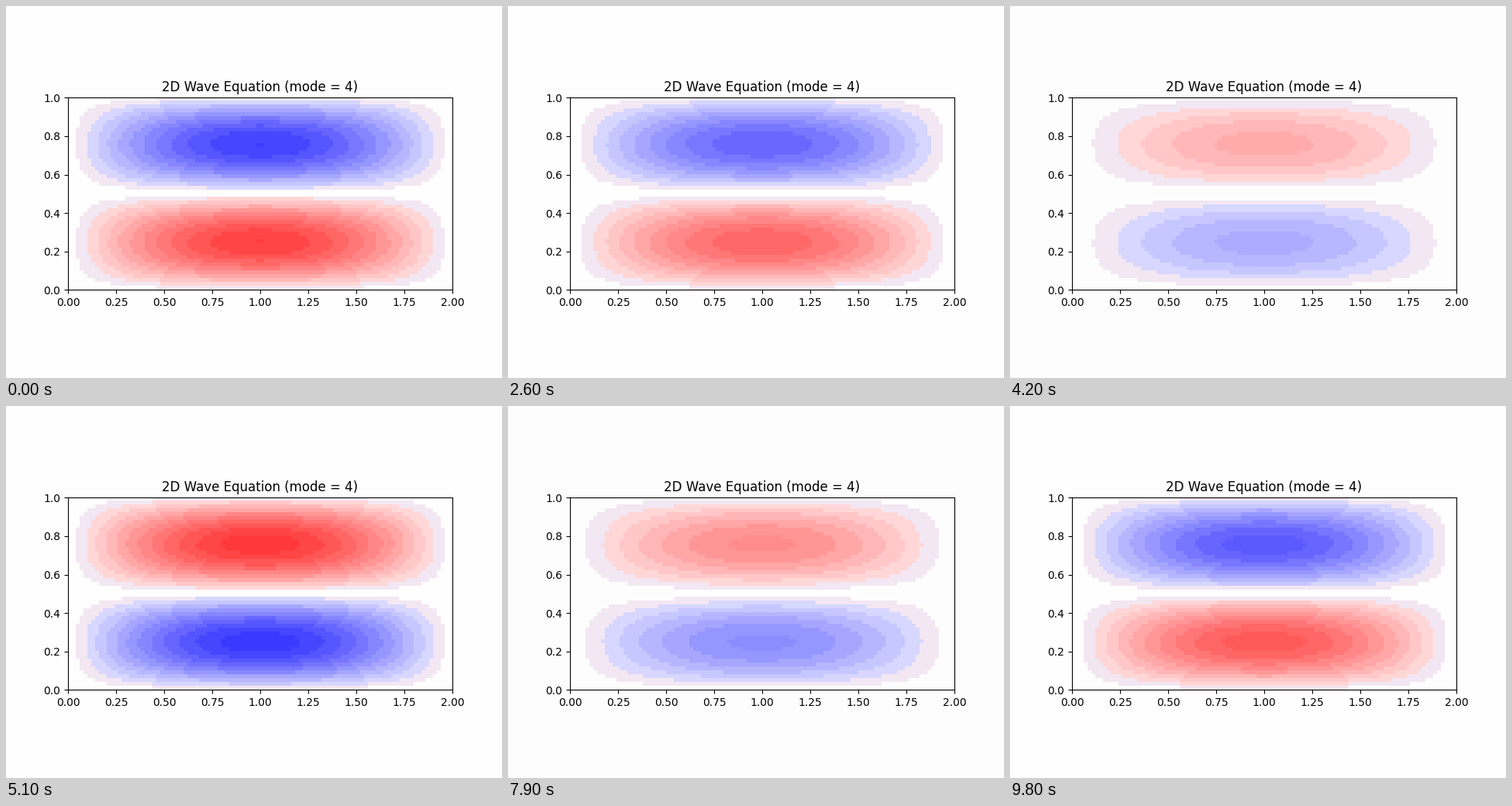
Write a matplotlib script that moves like this. It is 640 px wide and 480 px high and loops after 9900 ms.

```python
import numpy as np
import matplotlib.pyplot as plt
from matplotlib.animation import FuncAnimation

WIDTH, HEIGHT, DPI = 640, 480, 100
COLS, ROWS = 100, 50
FRAMES, INTERVAL = 99, 100
PERIOD, PEAK = 100, 11.5  # oscillation, in frames

# Pixels of the page around the plot, measured in grid cells
PLOT_AREA = 496 * 248
MARGIN = (WIDTH * HEIGHT - PLOT_AREA) / (PLOT_AREA / (COLS * ROWS))

# Standing wave on the interior points of a 2 x 1 membrane
x = np.arange(1, COLS + 1) / (COLS + 1)
y = np.arange(1, ROWS + 1) / (ROWS + 1)
mode = -np.outer(np.sin(2 * np.pi * y), np.sin(np.pi * x))
mode /= np.abs(mode).max()

cmap = plt.get_cmap("bwr")


def bin_index(rgb):
    """Coarse colour bin: 3 bits red, 4 bits green, 3 bits blue."""
    r, g, b = np.moveaxis(rgb, -1, 0)
    return (r >> 5) << 7 | (g >> 4) << 3 | b >> 5


def banded(u):
    """Colour the field in flat bands; return the image and the page colour."""
    rgb = cmap((u + 1) / 2, bytes=True)[..., :3].astype(int).reshape(-1, 3)
    white = np.array([[255, 255, 255]])
    pixels = np.vstack([rgb, white])
    weight = np.ones(len(pixels))
    weight[-1] = MARGIN

    index = bin_index(pixels)
    total = np.bincount(index, weight)
    mean = [np.bincount(index, weight * channel)[index] / total[index]
            for channel in pixels.T]
    colours = np.floor(np.stack(mean, axis=-1) + 1e-6).astype(np.uint8)
    return colours[:-1].reshape(ROWS, COLS, 3), colours[-1] / 255


def field(n):
    return mode * np.cos(2 * np.pi * (n - PEAK) / PERIOD)


fig, ax = plt.subplots(figsize=(WIDTH / DPI, HEIGHT / DPI), dpi=DPI)
image = ax.imshow(banded(field(0))[0], extent=[0, 2, 0, 1])
ax.set_title("2D Wave Equation (mode = 4)")


def update(n):
    bands, page = banded(field(n))
    image.set_data(bands)
    fig.set_facecolor(tuple(page))
    return [image]


anim = FuncAnimation(fig, update, frames=FRAMES, interval=INTERVAL,
                     repeat=True, repeat_delay=0, blit=False)
plt.show()
```
